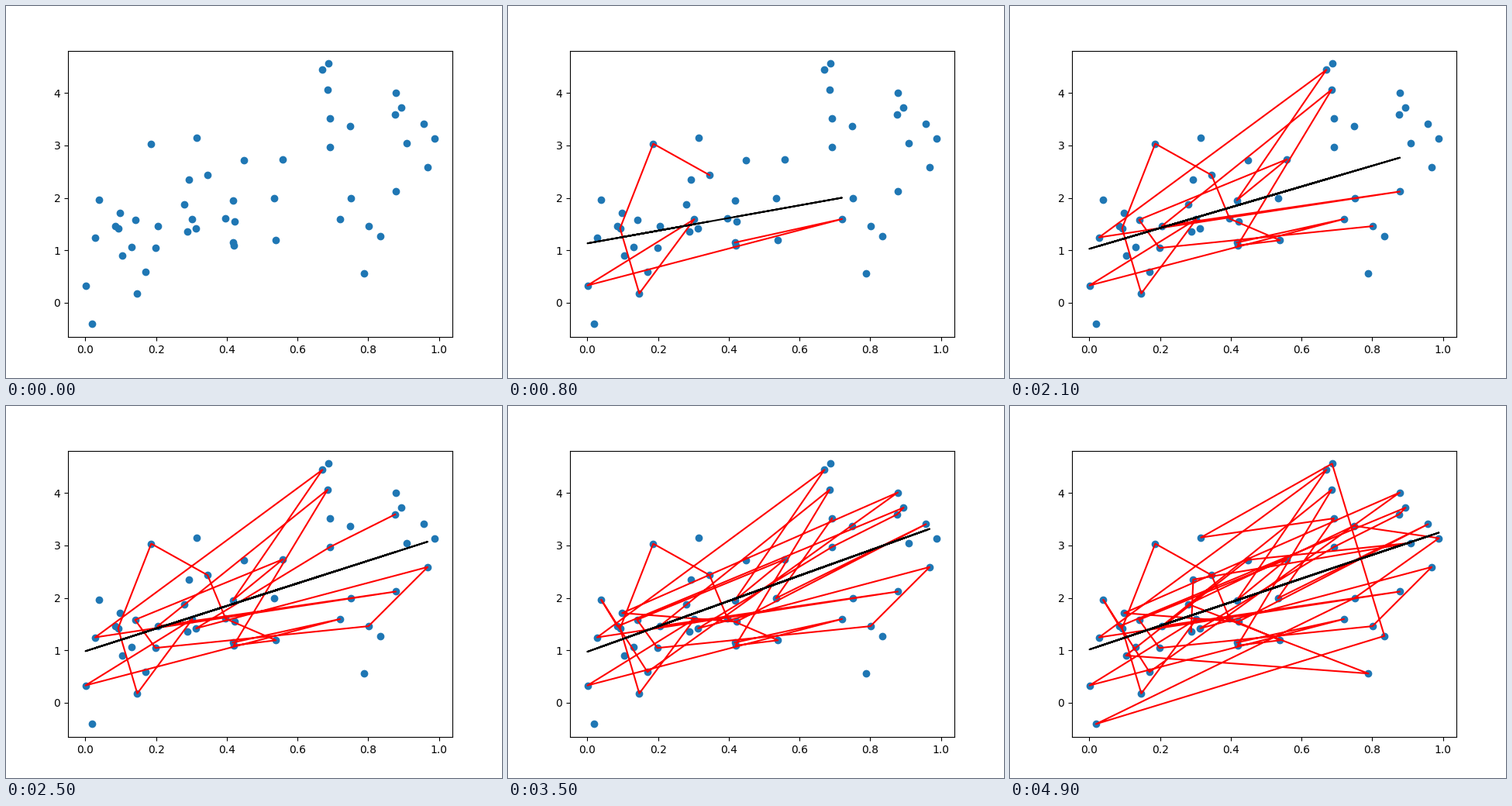
A matplotlib script for the animation above (5000 ms loop, 640x480 px).

```python
import numpy as np
import matplotlib.pyplot as plt
from matplotlib.animation import FuncAnimation

COUNT = 50
STEP_MS = 100

rng = np.random.RandomState(1)
x = rng.rand(COUNT)
y = 2 * x + 1 + rng.randn(COUNT)

fig, ax = plt.subplots(figsize=(6.4, 4.8), dpi=100)
ax.scatter(x, y)
path, = ax.plot([], [], "r-")
fit, = ax.plot([], [], "k-")


def update(n):
    """Join the first n samples and draw their least-squares line."""
    if n < 2:
        path.set_data([], [])
        fit.set_data([], [])
    else:
        xs, ys = x[:n], y[:n]
        slope, intercept = np.polyfit(xs, ys, 1)
        path.set_data(xs, ys)
        fit.set_data(xs, slope * xs + intercept)
    return path, fit


anim = FuncAnimation(fig, update, frames=COUNT, interval=STEP_MS, repeat=True)
plt.show()
```
